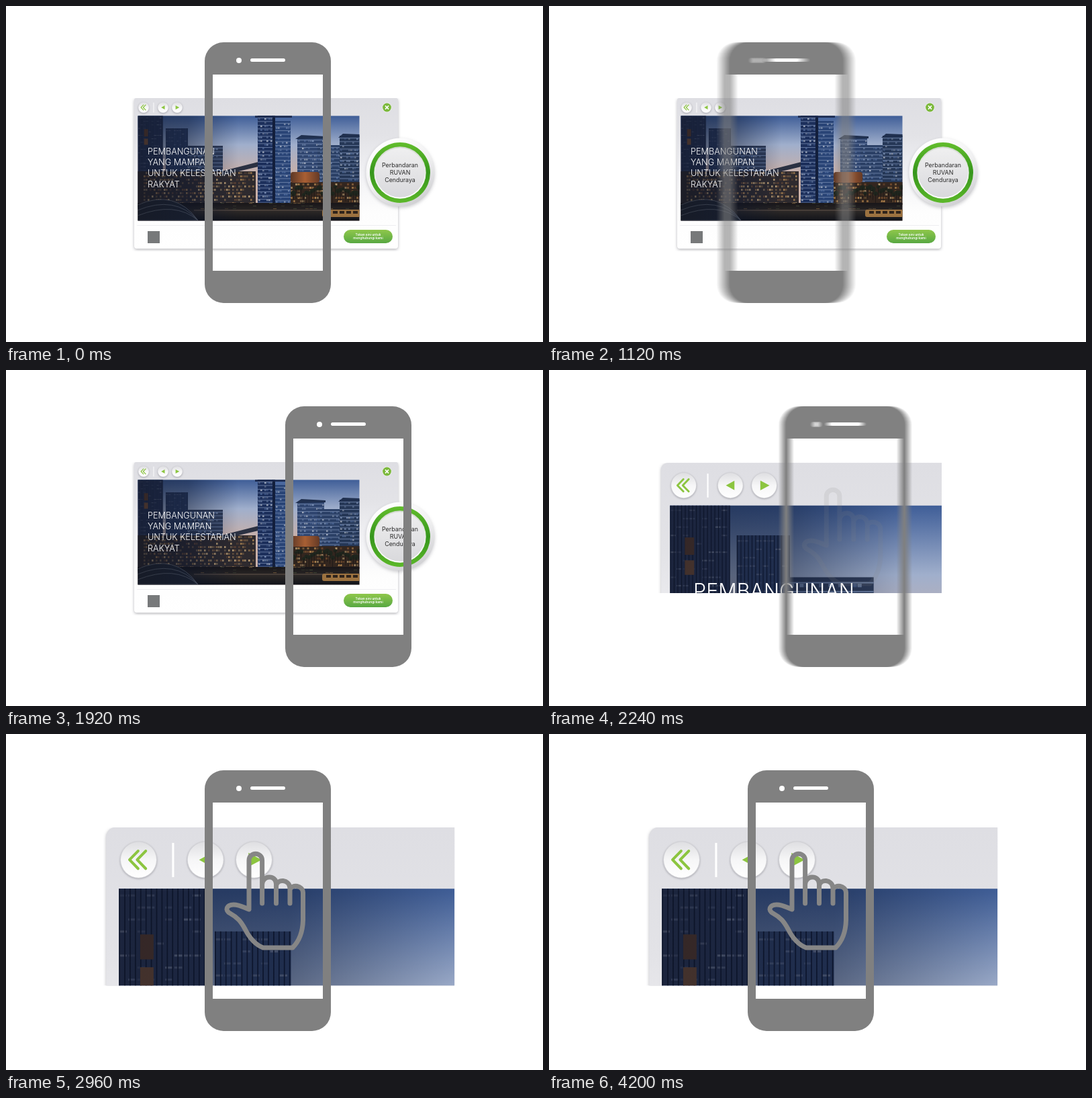
These frames come from a looping animation (800 by 500 pixels, 4320 ms). An HTML page with a canvas:

```html
<!DOCTYPE html>
<html lang="ms">
<head>
<meta charset="utf-8">
<title>Phone over a web page</title>
<style>
html, body { margin: 0; width: 100%; height: 100%; overflow: hidden; background: #fff; }
canvas { display: block; }
</style>
</head>
<body>
<canvas id="stage" width="800" height="500"></canvas>
<script>
const LOOP = 4320, STEP = 40, GREEN = '#8cc540', GREY = '#808080';
const c = document.getElementById('stage').getContext('2d');
const blur = new OffscreenCanvas(800, 500).getContext('2d');

const clamp = v => Math.max(0, Math.min(1, v));
const mix = (a, b, k) => a + (b - a) * k;
function ease(t, from, to) {
  const p = clamp((t - from) / (to - from));
  return p < .5 ? 8 * p ** 4 : 1 - 8 * (1 - p) ** 4;
}
// Quick start, long soft arrival
const settle = t => 1 - (1 - clamp((t - 1920) / 880) ** 2) ** 6;

let seed = 1;
function rnd() {
  seed = (seed * 16807) % 2147483647;
  return seed / 2147483647;
}

function lin(x0, y0, x1, y1, ...cols) {
  const g = c.createLinearGradient(x0, y0, x1, y1);
  cols.forEach((col, i) => g.addColorStop(i / (cols.length - 1), col));
  return g;
}
function rect(x, y, w, h, fill) {
  c.fillStyle = fill;
  c.fillRect(x, y, w, h);
}
function round(x, y, w, h, r, fill) {
  c.fillStyle = fill;
  c.beginPath();
  c.roundRect(x, y, w, h, r);
  c.fill();
}
function disc(x, y, r, fill) {
  c.fillStyle = fill;
  c.beginPath();
  c.arc(x, y, r, 0, 7);
  c.fill();
}
function poly(fill, ...p) {
  c.fillStyle = fill;
  c.beginPath();
  for (let i = 0; i < p.length; i += 2) c.lineTo(p[i], p[i + 1]);
  c.fill();
}
function line(col, width, ...p) {
  c.strokeStyle = col;
  c.lineWidth = width;
  c.beginPath();
  for (let i = 0; i < p.length; i += 2) c.lineTo(p[i], p[i + 1]);
  c.stroke();
}
function text(lines, x, y, gap, font, fill, align) {
  c.font = font + ' Inter, sans-serif';
  c.fillStyle = fill;
  c.textAlign = align;
  lines.forEach((s, i) => c.fillText(s, x, y + i * gap));
}
function shadow(col, size, dy) {
  c.shadowColor = col;
  c.shadowBlur = size;
  c.shadowOffsetY = dy;
}

// Scattered lit windows on a grid
function lights(x, y, w, h, dx, dy, size, chance, ...cols) {
  for (let v = y; v < y + h; v += dy)
    for (let u = x; u < x + w - dx / 2; u += dx)
      if (rnd() < chance) {
        c.globalAlpha = .25 + .5 * rnd();
        rect(u, v, dx * .85, size, cols[Math.floor(rnd() * cols.length)]);
      }
  c.globalAlpha = 1;
}
function darkTower(x, y, w, h, fill) {
  rect(x, y, w, h, fill);
  lights(x, y + 3, w, h - 3, 4, 5.2, .9, .45, '#6a7799', '#8d97b0');
  for (let u = x; u < x + w; u += 2.3) rect(u, y, .5, h, '#111a32');
}
function glassTower(x, y, w, h, fill) {
  rect(x, y, w, h, fill);
  for (let v = y + 3; v < y + h; v += 5.5) rect(x, v, w, .8, '#7488ad');
  lights(x + 1, y + 4, w - 2, h - 5, 3, 5.5, 2.2, .4, '#5a76a8', '#93a8cc', '#c9cfd9');
}

function photo() {
  seed = 77;
  c.save();
  c.beginPath();
  c.rect(196.5, 163.5, 330, 156);
  c.clip();
  rect(196, 163, 331, 157, lin(0, 163, 0, 250, '#3e5d97', '#a0afcc', '#c9b0a8'));
  darkTower(196.5, 163, 37, 140, '#2d3a5c');
  rect(205.7, 183.3, 5.8, 10.8, '#5f3f2e');
  rect(205.7, 197.5, 5.8, 9, '#7a5238');
  darkTower(238, 182, 33, 115, '#33456c');
  glassTower(270, 208, 53, 85, '#2f3c58');
  rect(196, 246, 176, 54, '#2e2a2e');
  lights(205, 247, 166, 50, 3, 5, 3, .5, '#c0935a', '#dcb983', '#6d4c36');
  poly('#2b3142', 321, 246, 376, 232, 376, 239, 321, 252);

  glassTower(434, 196, 40, 75, '#2f456f');
  glassTower(464, 207, 36, 70, '#2b4066');
  glassTower(497, 193, 30, 90, '#253756');
  poly('#20304f', 431, 198, 440, 192, 476, 194, 476, 197);
  poly('#20304f', 495, 196, 502, 190, 527, 191, 527, 195);
  glassTower(375, 163, 23, 131, '#1c2f5b');
  glassTower(401, 171, 23, 123, '#294476');
  rect(397, 163, 4, 130, '#131f3c');
  rect(371, 163, 55, 3, '#18264a');

  rect(424, 262, 103, 34, '#33261f');
  lights(424, 264, 103, 28, 3.5, 5, 3, .5, '#d09a58', '#e6c48c', '#8a5a34');
  round(424, 247, 43, 16, 4, lin(424, 0, 467, 0, '#5c3726', '#a85f34', '#653a26'));
  for (let i = 0; i < 26; i++) {
    const x = 428 + i * 3.9, y = 269 + 12 * rnd();
    disc(x, y, 2 + 2 * rnd(), '#1e251d');
    rect(x - .4, y, .8, 16, '#1c1816');
  }
  rect(196, 293, 331, 27, lin(0, 293, 0, 319, '#181619', '#2b2726', '#12141a'));
  lights(290, 293, 236, 10, 6, 4, 1.2, .3, '#7d623f', '#454d38');
  rect(280, 303, 247, 2, '#463d38');
  round(471, 303, 60, 11, 3, '#9c7240');
  for (let x = 477; x < 527; x += 10) rect(x, 305, 7, 4, '#30241b');

  c.fillStyle = '#232730';
  c.strokeStyle = '#70757e';
  c.lineWidth = .8;
  for (let i = 0; i < 3; i++) {
    c.beginPath();
    c.moveTo(196, 296 + i * 8);
    c.quadraticCurveTo(252, 272 + i * 9, 286, 319);
    if (!i) { c.lineTo(196, 319); c.fill(); }
    c.stroke();
  }
  rect(196, 163, 150, 157, lin(196, 0, 346, 0, 'rgba(10,15,30,.5)', 'rgba(8,18,42,.45)', 'rgba(8,20,48,0)'));
  c.restore();
}

function knob(x) {
  shadow('rgba(110,110,120,.5)', 3, 1);
  disc(x, 151, 8, '#d3d3d7');
  shadow('transparent', 0, 0);
  disc(x, 151, 7.7, lin(0, 143, 0, 159, '#dedee1', '#f6f6f7', '#fff'));
}

function toolbar() {
  [205, 234, 255].forEach(knob);
  c.lineCap = c.lineJoin = 'round';
  for (const x of [201.1, 204.4]) line(GREEN, 1.2, x + 3.7, 147.2, x, 151, x + 3.7, 154.8);
  rect(219.5, 143.7, .9, 14.8, '#fff');
  poly(GREEN, 231.2, 151, 236.5, 148.1, 236.5, 153.9);
  poly(GREEN, 258.3, 151, 252.6, 148, 252.6, 154);
  disc(567.5, 151, 7.2, '#eeeeef');
  disc(567.5, 151, 6.4, '#7cb93c');
  line('#fff', 1.5, 565.4, 148.9, 569.6, 153.1);
  line('#fff', 1.5, 569.6, 148.9, 565.4, 153.1);
}

function roundButton() {
  shadow('rgba(90,90,100,.3)', 5, 2);
  disc(587.5, 247.5, 51, lin(560, 200, 612, 296, '#fff', '#f1f1f2', '#cfcfd2'));
  shadow('transparent', 0, 0);
  disc(587, 248, 45, lin(0, 203, 0, 293, '#62bd2c', '#36961c', '#5cb82a'));
  disc(587, 248, 38.7, lin(0, 209, 0, 287, '#d3d9d0', '#fff'));
  disc(587, 248, 36.8, lin(0, 211, 0, 285, '#efeff0', '#d9d9dc'));
  text(['Perbandaran', 'RUVAN', 'Cenduraya'], 587, 240, 11, '8.9px', '#2b2b2b', 'center');
}

function card() {
  shadow('rgba(120,120,130,.55)', 4, 1.5);
  round(191, 137, 393, 224, 4, '#dedee3');
  shadow('transparent', 0, 0);
  round(191, 137, 393, 224, 4, lin(0, 137, 0, 361, '#dedee3', '#e3e3e7', '#f1f1f4', '#fdfdfd', '#fff'));
  rect(195, 326, 386, .7, '#e9e9ec');
  photo();
  text(['PEMBANGUNAN', 'YANG MAMPAN', 'UNTUK KELESTARIAN', 'RAKYAT'], 211, 221, 16.2, '300 12.7px', '#fff', 'left');
  toolbar();
  rect(211, 335, 18, 18, '#77797a');
  round(503, 333, 73, 20, 10, lin(0, 333, 0, 353, '#8fc74b', '#58a842'));
  text(['Tekan sini untuk', 'menghubungi kami'], 539.5, 342, 5.4, '600 4.8px', '#fff', 'center');
  roundButton();
}

// The card grows from its top left corner while its crop closes in
function zoomCard(e) {
  const s = mix(1, 3.44, e), q = 1 - (1 - e) ** 3;
  c.save();
  c.translate(mix(188, 139, e), mix(137, 139, e));
  c.scale(s, s);
  c.beginPath();
  c.rect(-1, 0, mix(456, 154.8, q), mix(228, 68.4, q));
  c.clip();
  c.translate(-188, -137);
  card();
  c.restore();
}

const body = new Path2D();
body.roundRect(0, 54, 188, 388, 28);
body.rect(12, 102, 164, 292);
body.roundRect(68, 78, 52, 5, 2.5);
body.roundRect(47, 77, 8, 8, 4);

function fillPhone(g, x) {
  g.save();
  g.translate(x, 0);
  g.fillStyle = GREY;
  g.fill(body, 'evenodd');
  g.restore();
}

const phoneX = t => 296 - 78 * ease(t, 0, 600) + 198 * ease(t, 800, 1600) - 120 * settle(t);

// Fast moves are averaged over one time step, then tinted evenly
function phone(t) {
  const a = phoneX(t - STEP / 2), b = phoneX(t + STEP / 2);
  const n = Math.ceil(Math.abs(b - a));
  if (n < 2) return fillPhone(c, phoneX(t));
  blur.globalCompositeOperation = 'lighter';
  blur.clearRect(0, 0, 800, 500);
  blur.globalAlpha = 1 / n;
  for (let i = 0; i < n; i++) fillPhone(blur, mix(a, b, (i + .5) / n));
  blur.globalAlpha = 1;
  blur.globalCompositeOperation = 'source-in';
  blur.fillStyle = GREY;
  blur.fillRect(0, 0, 800, 500);
  c.drawImage(blur.canvas, 0, 0);
}

const hand = new Path2D(`M362 259V188a9.8 9.8 0 0 1 19.6 0V252M381.6 224
  C382 210 402 209 402.5 223V252M402.5 226C404 215 422 216 423 229V252
  M423 232C426 223 442 225 442.5 236V277C442 296 437 308 427 318H383
  C370 313 362 302 356 290C350 279 345 273 334 267C325 262 329 254 339 254
  C348 254 354 258 362 261`);

function drawHand(t, e) {
  c.save();
  c.globalAlpha = clamp(e * 2 - 1);
  c.translate(phoneX(t) - 296, 0);
  c.lineCap = c.lineJoin = 'round';
  c.lineWidth = 7;
  c.strokeStyle = '#868686';
  c.stroke(hand);
  c.restore();
}

function pulse(t) {
  const u = clamp((t - 2900) / 900);
  c.globalAlpha = .74 * clamp((4160 - t) / 700);
  disc(368.5, 187, 40 * u * (2 - u), GREEN);
  c.globalAlpha = 1;
}

function draw(now) {
  const t = Math.min(Math.floor(now % LOOP / STEP) * STEP, 4200);
  const e = settle(t);
  c.clearRect(0, 0, 800, 500);
  zoomCard(e);
  pulse(t);
  phone(t);
  drawHand(t, e);
}

const start = performance.now();
function tick() {
  draw(performance.now() - start);
  requestAnimationFrame(tick);
}
tick();
</script>
</body>
</html>
```
